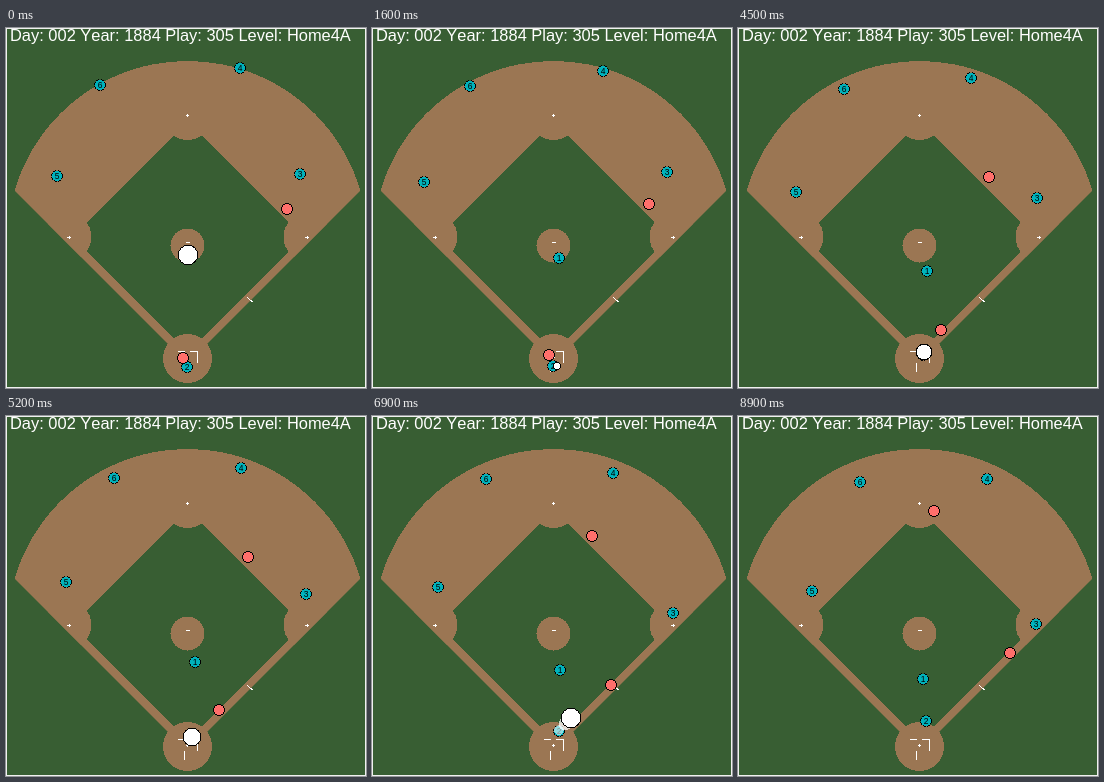
Write an HTML page that moves like this. It is 360 px wide and 360 px high and loops after 9 s.

```html
<!DOCTYPE html>
<html lang="en">
<head>
<meta charset="utf-8">
<title>Ball field play</title>
<style>
  html, body { margin: 0; width: 100%; height: 100%; overflow: hidden; background: #385e33; }
  svg { display: block; width: 100vw; height: 100vh; }
  .dirt { fill: #9b7653; }
  .grass { fill: #385e33; }
  .chalk { stroke: #fff; fill: none; }
  .title { font: 16.45px "Liberation Sans", Arial, sans-serif; font-kerning: none; fill: #fff; }
  .number { font: 8.5px "Liberation Sans", Arial, sans-serif; text-anchor: middle; }
  .fielder { fill: #00b2bb; stroke: #000; stroke-dasharray: 3 1.32; }
  .runner { fill: #ff6f6b; stroke: #000; }
  .ball { fill: #fff; stroke: #000; }
  .trail { fill: #fff; }
</style>
</head>
<body>
<svg viewBox="0 0 360 360" shape-rendering="crispEdges">
  <clipPath id="fair"><path d="M181.5 335.5L0 154V0H363V154Z"/></clipPath>
  <rect class="grass" width="360" height="360"/>
  <g clip-path="url(#fair)">
    <circle class="dirt" cx="181.5" cy="213" r="180"/>
    <path class="grass" d="M181.5 93.5L297 209L181.5 324.5L66 209Z"/>
    <circle class="dirt" cx="181.5" cy="87" r="25"/>
    <circle class="dirt" cx="61.5" cy="209" r="24"/>
    <circle class="dirt" cx="301.5" cy="209" r="24"/>
  </g>
  <circle class="dirt" cx="181.5" cy="217.5" r="17"/>
  <circle class="dirt" cx="181.5" cy="330.5" r="24.5"/>
  <path class="chalk" d="M180 214.5h4M172 323.5h7M184 323.5h8M191.5 323v12M178.5 335v9M241.5 269.5l5 4.5"/>
  <path class="chalk" d="M180 87.5h3m-1.500-1.500v3M61 209.500h4m-2-1.500v3M299 209.500h4m-2-1.500v3M180 329.500h3m-1.500-1.500v3"/>
  <rect x=".5" y=".5" width="359" height="359" fill="none" stroke="#f0f0f0"/>
  <text class="title" x="4" y="13">Day: 002 Year: 1884 Play: 305 Level: Home4A</text>
  <g id="actors"></g>
</svg>
<script>
const LOOP = 9000, STEP = 100, LAST = LOOP - STEP;
const PITCH = 0, CATCH = 1300, THROW = 6700, OUT = 8530;
const BALL_RADIUS = 9.7, TRAIL_LENGTH = 4;

// Each player runs along one Bezier curve: start, bends, end.
const PLAYERS = [
  { label: '6', curve: [[94, 57], [103, 60], [122, 66]] },
  { label: '4', curve: [[234, 40], [224, 45], [236, 54], [249, 63]] },
  { label: '5', curve: [[51, 148], [53, 166], [74, 175]] },
  { label: '3', curve: [[294, 146], [293, 127], [308, 206], [298, 208]] },
  { label: '1', curve: [[184, 223], [193, 243], [185, 263]] },
  { label: '2', curve: [[181, 339], [180, 341], [189, 318], [188, 305]] },
  { curve: [[281, 181], [283, 179], [228, 129], [196, 95]] },
  { curve: [[177, 330], [165, 332], [225, 287], [272, 237]] }
];
const MOUND = [182, 227], PLATE = [185, 339], RELEASE = [187, 314], FIRST_BASE = [298, 203];

const actors = document.getElementById('actors');

function add(parent, tag, attrs) {
  const node = document.createElementNS('http://www.w3.org/2000/svg', tag);
  for (const key in attrs) node.setAttribute(key, attrs[key]);
  return parent.appendChild(node);
}

const mix = (a, b, k) => a.map((v, axis) => v + (b[axis] - v) * k);

function bezier(points, k) {
  if (points.length === 1) return points[0];
  return bezier(points.slice(1).map((p, i) => mix(points[i], p, k)), k);
}

function placeCircle(node, point, r) {
  const [x, y] = point.map(Math.round);
  node.setAttribute('cx', x);
  node.setAttribute('cy', y);
  node.setAttribute('r', r);
}

for (const player of PLAYERS) {
  player.node = add(actors, 'g', {});
  add(player.node, 'circle', { class: player.label ? 'fielder' : 'runner', r: 5.5 });
  if (player.label) add(player.node, 'text', { class: 'number', y: 3 }).textContent = player.label;
}
const trail = Array.from({ length: TRAIL_LENGTH }, (_, i) =>
  add(actors, 'circle', { class: 'trail', opacity: 0.22 + 0.17 * i }));
const ball = add(actors, 'circle', { class: 'ball' });

function ballAt(t) {
  if (t < CATCH) return mix(MOUND, PLATE, (t - PITCH) / (CATCH - PITCH));
  if (t < THROW) return mix(PLATE, RELEASE, (t - CATCH) / (THROW - CATCH));
  return mix(RELEASE, FIRST_BASE, (t - THROW) / (OUT - THROW));
}

function drawBall(t) {
  const held = t >= CATCH && t < THROW;
  const thrownAt = t < CATCH ? PITCH : THROW;
  // A held ball grows until it is released.
  const radius = held ? Math.min(BALL_RADIUS, 3.3 + (t - CATCH) / 700) : BALL_RADIUS;
  placeCircle(ball, ballAt(t), radius);
  ball.style.display = t > OUT ? 'none' : '';
  trail.forEach((dot, i) => {
    const past = t - (TRAIL_LENGTH - i) * STEP;
    const visible = !held && t <= OUT && past >= thrownAt;
    dot.style.display = visible ? '' : 'none';
    if (visible) placeCircle(dot, ballAt(past), 1.6 * (i + 1));
  });
}

function render(t) {
  for (const { node, curve } of PLAYERS) {
    node.setAttribute('transform', `translate(${bezier(curve, t / LAST).map(Math.round)})`);
  }
  drawBall(t);
}

const begin = performance.now();
function tick() {
  const elapsed = (performance.now() - begin) % LOOP;
  render(Math.floor(elapsed / STEP) * STEP);
  requestAnimationFrame(tick);
}
tick();
</script>
</body>
</html>
```
